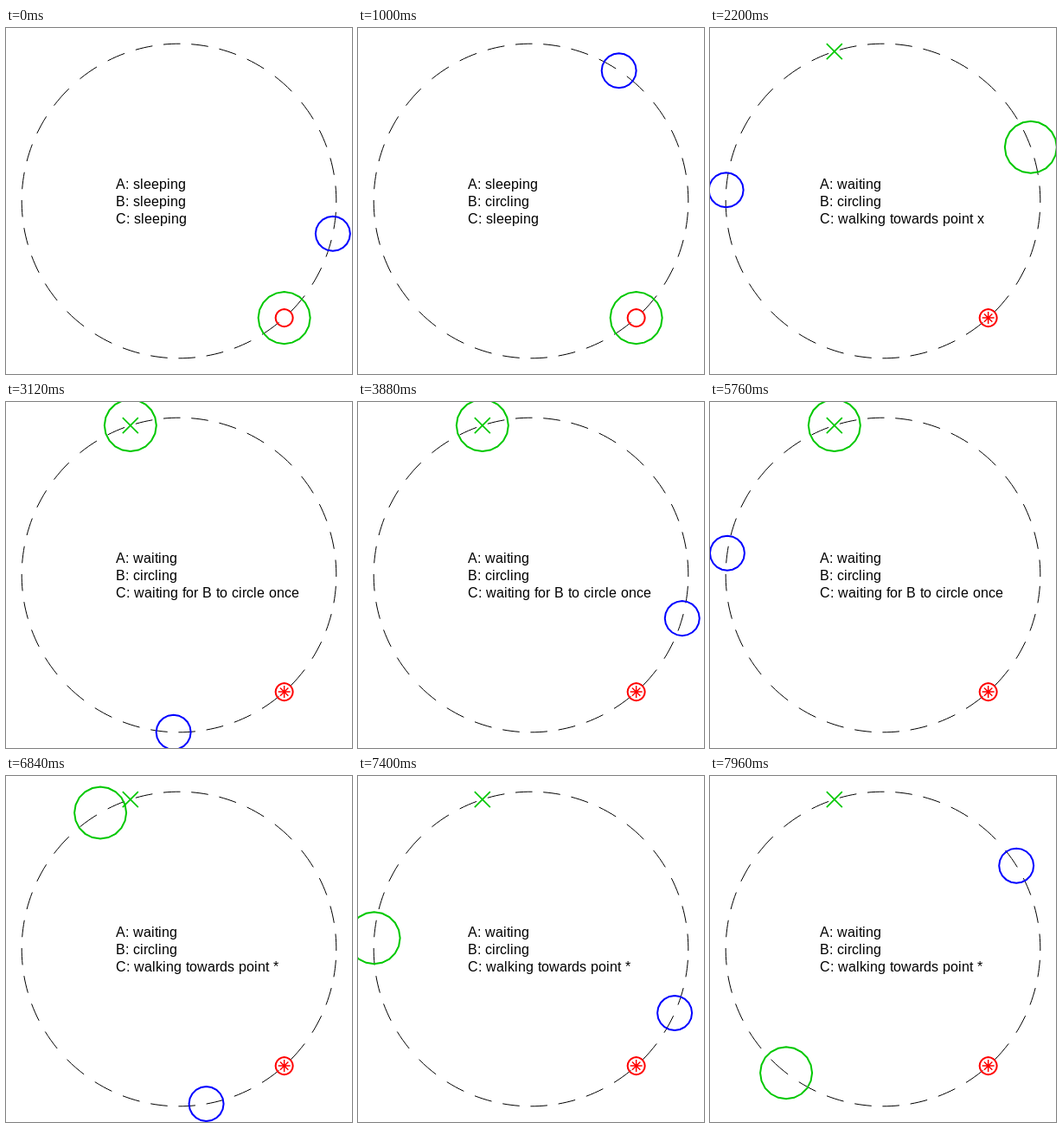
Write an HTML page that moves like this. It is 400 px wide and 400 px high and loops after 8000 ms.

```html
<!DOCTYPE html>
<html lang="en">
<head>
<meta charset="utf-8">
<title>Three walkers on a ring</title>
<style>
  html, body { margin: 0; width: 100%; height: 100%; overflow: hidden; background: #fff; }
  svg { display: block; width: 100vw; height: 100vh; }
  .lines { fill: none; stroke-width: 2; }
  text { font: 16px "Liberation Sans", Arial, sans-serif; fill: #000; }
</style>
</head>
<body>
<svg viewBox="0 0 400 400" xmlns="http://www.w3.org/2000/svg">
  <g class="lines">
    <path id="track" stroke="#000" stroke-width="1"/>
    <path id="a" stroke="#f00"/>
    <path id="c" stroke="#00c800"/>
    <path id="b" stroke="#00f"/>
    <path id="cross" stroke="#00c800" stroke-width="1.7" d="M-9-9L9 9M-9 9L9-9"/>
    <path id="star" stroke="#f00" stroke-width="1.5" d="M-7 0H7M0-7V7M-4.7-4.7L4.7 4.7M-4.7 4.7L4.7-4.7"/>
  </g>
  <text id="textA" y="186"></text>
  <text id="textB" y="206"></text>
  <text id="textC" y="226"></text>
</svg>
<script>
const LOOP = 8000, REST = 360, STEP = 40;
const MID = 200, R = MID / 1.1, TURN = 4;
const HOME = -48, B_START = -12, CROSS = 108;
// Step numbers at which a walker changes its state
const WAKE = 31, ARRIVE = 70, RETURN = 161;

const $ = id => document.getElementById(id);
const rad = deg => deg * Math.PI / 180;
const onTrack = deg => [MID + R * Math.cos(rad(deg)), MID - R * Math.sin(rad(deg))];
const toPath = points => 'M' + points.map(p => p.map(v => v.toFixed(2)).join(' ')).join('L');

function place(id, deg) {
  $(id).setAttribute('transform', `translate(${onTrack(deg).map(v => v.toFixed(2)).join(' ')})`);
}

function ring(id, r, sides = 20) {
  const points = Array.from({ length: sides }, (_, i) => {
    const t = rad(360 * i / sides);
    return [r * Math.cos(t), r * Math.sin(t)];
  });
  $(id).setAttribute('d', toPath(points) + 'Z');
}

// Dashes are counted along the steeper axis, so they grow on the diagonals.
const HALF = R * Math.SQRT1_2;
function trackAngle(s) {
  const side = Math.floor((s + HALF) / (2 * HALF));
  return side * 90 + Math.asin((s - side * 2 * HALF) / R) * 180 / Math.PI;
}

function drawTrack() {
  const period = 32.2, dash = 19.5, first = -2;
  let d = '';
  for (let s = first; s < 8 * HALF - 3; s += period) {
    const points = [];
    for (let i = 0; i <= 4; i++) points.push(onTrack(trackAngle(s + dash * i / 4)));
    d += toPath(points);
  }
  $('track').setAttribute('d', d);
}

// Letters sit on whole pixels.
const pen = document.createElement('canvas').getContext('2d');
pen.font = '16px "Liberation Sans", Arial, sans-serif';
const advance = ch => ch === ' ' ? 5 : Math.round(pen.measureText(ch).width);

function write(id, str) {
  const el = $(id);
  if (el.textContent === str) return;
  let x = 127;
  const xs = [...str].map(ch => { const at = x; x += advance(ch); return at; });
  el.textContent = str;
  el.setAttribute('x', xs.join(' '));
}

function stateC(n) {
  if (n < WAKE) return ['sleeping', HOME];
  if (n < ARRIVE) return ['walking towards point x', HOME + TURN * (n - WAKE + 1)];
  if (n < RETURN) return ['waiting for B to circle once', CROSS];
  return ['walking towards point *', CROSS + TURN * (n - RETURN + 1)];
}

function draw(time) {
  const t = time % LOOP;
  const n = t < REST ? 0 : Math.floor((t - REST) / STEP) + 1;
  const awake = n >= WAKE;
  const [label, angle] = stateC(n);

  place('b', B_START + TURN * n);
  place('c', angle);
  for (const id of ['cross', 'star']) $(id).setAttribute('visibility', awake ? 'visible' : 'hidden');

  write('textA', 'A: ' + (awake ? 'waiting' : 'sleeping'));
  write('textB', 'B: ' + (n ? 'circling' : 'sleeping'));
  write('textC', 'C: ' + label);
}

drawTrack();
ring('a', 10);
ring('b', 20);
ring('c', 30);
place('a', HOME);
place('star', HOME);
place('cross', CROSS);

const start = performance.now();
function tick() {
  draw(performance.now() - start);
  requestAnimationFrame(tick);
}
tick();
</script>
</body>
</html>
```
